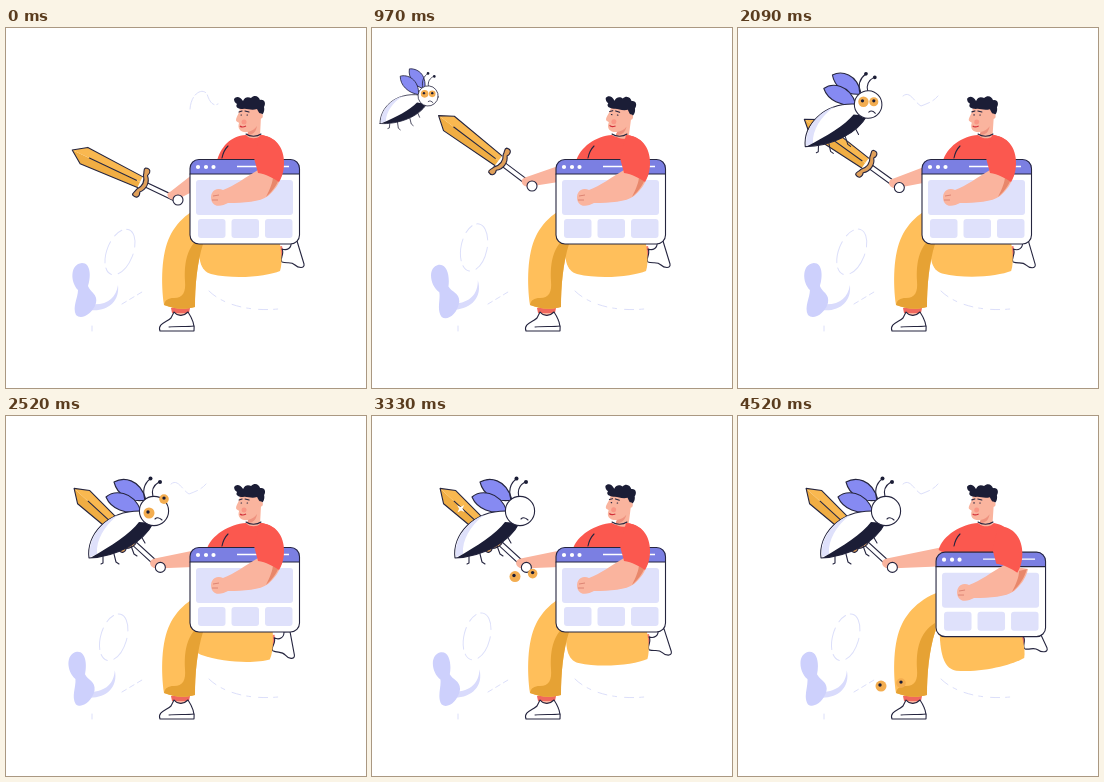
Animation, 360 px wide and 360 px high, one loop 4550 ms. Source, as an HTML page:

```html
<!DOCTYPE html>
<html lang="en">
<head>
<meta charset="utf-8">
<title>Bug hunt</title>
<style>
  html, body { margin: 0; width: 100%; height: 100%; overflow: hidden; background: #fff; }
  svg { display: block; width: 100vw; height: 100vh; }
  .ink { stroke: #25253f; stroke-width: 1.1; stroke-linecap: round; stroke-linejoin: round; }
  .line { fill: none; }
  .white { fill: #fff; }
  .dark { fill: #1b1d36; }
  .skin { fill: #fab49e; }
  .red { fill: #fb584f; }
  .gold { fill: #ffbf5b; }
  .shade { fill: #e6a234; }
  .violet { fill: #7b7fe2; }
  .pale { fill: #dfe1fb; }
  .faint { fill: none; stroke: #dcdffa; stroke-width: 1; stroke-linecap: round; }
</style>
</head>
<body>
<svg viewBox="0 0 360 360">
  <rect width="360" height="360" fill="#fff"/>

  <g id="plant">
    <ellipse class="faint" cx="114" cy="224" rx="13" ry="24" transform="rotate(22 114 224)" stroke-dasharray="22 7 9 5"/>
    <path d="M84 282C101 284 114 274 112 257C110 270 101 278 84 276Z" fill="#d9dbfc"/>
    <path d="M76 235C85 235 85 249 82 258C84 264 92 266 90 275C86 287 75 292 70 287C66 279 72 270 72 262C64 254 64 236 76 235Z" fill="#cdd0fc"/>
  </g>
  <path class="faint" d="M86 298V303M116 276L136 264" stroke-dasharray="5 4"/>
  <path class="faint" d="M203 263C215 275 240 284 272 281" stroke-dasharray="9 6 4 8"/>
  <path id="curl" class="faint" d="M184 81C185 66 196 59 201 66C203 72 206 79 212 76" stroke-dasharray="12 3"/>
  <path id="bird" class="faint" d="M165 68C172 62 176 74 183 78C188 76 195 74 200 68" stroke-dasharray="14 4"/>

  <g id="backLeg">
    <path d="M270 219L276 218L279 231L272 234Z" fill="#f2776b"/>
    <path class="ink white" d="M276 221C279 226 273 231 276 234C281 236 285 233 289 237C292 240 299 241 298 236L291 213L285 214C286 220 281 223 276 221Z"/>
    <path class="gold" d="M194 205C191 230 194 243 205 246C230 252 262 248 274 243C277 234 275 220 272 205Z"/>
  </g>

  <path class="skin" d="M166 277H183L182 289H167Z"/>
  <path d="M165 280H184L183 285H166Z" fill="#f0685e"/>
  <path class="ink white" d="M154 303C151 296 161 294 165 290L168 284C172 289 178 288 182 284C186 290 189 296 188 303Z"/>
  <path class="ink line" d="M163 299C172 298 180 299 188 298" stroke-width=".8"/>
  <path class="gold" d="M216 172C188 177 172 192 164 208C155 226 155 256 158 277C168 281 178 282 189 279C189 258 191 235 197 216L216 200Z"/>
  <path class="shade" d="M197 207C181 217 178 234 179 253C180 264 177 270 168 270C162 270 159 272 158 277C168 281 178 282 189 279C189 258 191 235 197 216Z"/>

  <g id="sword">
    <path d="M-42 6L-104 9L-117 0L-42 0Z" fill="#f0ad43"/>
    <path d="M-42 -6L-104 -9L-117 0L-42 0Z" fill="#f9b850"/>
    <path class="ink line" d="M-42 -6L-104 -9L-117 0L-104 9L-42 6M-98 0H-46" stroke-width=".9"/>
    <path id="glint" d="M0 -5L1.2 -1.2L5 0L1.2 1.2L0 5L-1.2 1.2L-5 0L-1.2 -1.2Z" fill="#fff" transform="translate(-88 1)"/>
    <rect class="ink white" x="-37" y="-2.400" width="33" height="4.800"/>
    <path class="ink" d="M-43 -15C-38 -17 -36 -13 -38 -9C-33 -4 -33 4 -38 9C-36 13 -38 17 -43 15C-45 13 -42 11 -42 8C-38 3 -38 -3 -42 -8C-42 -11 -45 -13 -43 -15Z" fill="#e0a05a"/>
  </g>
  <path id="arm" class="skin"/>
  <circle id="pommel" class="ink white" r="5"/>

  <path id="torso" class="red"/>
  <path class="ink line" d="M216 130C217 125 219 121 222 118"/>

  <g id="head">
    <path class="skin" d="M234 78C234 85 230 89 230 92C230 94 233 94 233 95C231 101 235 105 242 104L241 108C244 111 251 111 254 108L255 88L252 78Z"/>
    <path d="M242 104C246 103 249 101 251 98C250 104 247 107 241 107Z" fill="#ee927f"/>
    <circle cx="238" cy="94" r="2.500" fill="#f99685"/>
    <path class="dark" d="M228 71C230 68 234 68 237 73C239 68 243 69 245 70C249 66 253 69 254 72C259 71 260 76 258 79C259 83 257 87 255 87C253 85 252 83 251 81C245 83 241 80 237 81C232 81 229 79 231 76C229 75 228 73 228 71Z"/>
    <circle class="skin" cx="254" cy="88" r="2.800"/>
    <path class="ink line" d="M235 87H235.500M241 87H241.500M233 84L236 83M239 83L243 84" stroke-width="1"/>
    <path d="M234 98C236 100 238 99 240 98" fill="none" stroke="#d3303a" stroke-width="1.200"/>
  </g>
  <path class="ink line" d="M240 106C244 109 251 109 255 106"/>

  <g id="panel">
    <rect class="white" x="184" y="131.500" width="109.500" height="84.500" rx="9"/>
    <path class="violet" d="M184 146V140.500Q184 131.500 193 131.500H284.500Q293.500 131.500 293.500 140.500V146Z"/>
    <path class="ink line" d="M184 146H293.500" stroke-width="1"/>
    <path d="M192 139h0M200 139h0M207.500 139h0" stroke="#fff" stroke-width="4.200" stroke-linecap="round"/>
    <path d="M231 138.500H283" stroke="#fff" stroke-width="1.300"/>
    <g class="pale">
      <rect x="190" y="152" width="97" height="35" rx="3"/>
      <rect x="192" y="191" width="27.500" height="19" rx="3"/>
      <rect x="225.500" y="191" width="27.500" height="19" rx="3"/>
      <rect x="259" y="191" width="27.500" height="19" rx="3"/>
    </g>
    <rect class="ink line" x="184" y="131.500" width="109.500" height="84.500" rx="9" stroke-width="1.500"/>
  </g>

  <g id="forearm">
    <path class="skin" d="M252 142C240 149 228 158 217 162C213 160 208 161 206 165C204 169 205 175 209 177C213 179 218 177 222 175C238 175 254 174 262 168C269 162 274 155 276 146Z"/>
    <path d="M207 168L213 167M206 172L212 172" fill="none" stroke="#dd8574"/>
    <path d="M275 146C272 155 268 162 260 169C264 161 267 154 267 148Z" fill="#e8876b"/>
  </g>
  <path id="sleeve" class="red" d="M254 107C270 108 278 120 278 135C278 143 276 149 273 154C267 150 260 146 252 145L248 130Z"/>

  <g id="bug">
    <path class="ink line" d="M97 136V147L95 148M107 134L110 146L113 148M124 127L128 138L131 140M135 120L139 127"/>
    <g id="wings" class="ink" fill="#868af2">
      <path d="M140 84C134 62 117 61 108 66C111 78 123 87 140 84Z"/>
      <path d="M135 95C127 74 108 74 100 81C105 93 120 99 135 95Z"/>
    </g>
    <path class="ink white" d="M83 142C80 120 100 94 136 95L147 107C138 126 110 141 83 142Z"/>
    <path class="pale" d="M84 141C82 122 96 105 112 99C98 110 90 124 91 138Z"/>
    <path class="dark" d="M85 141.500C105 130 124 118 133 106L147 107C138 126 110 141 85 141.500Z"/>
    <path class="ink line" d="M139 84C136 74 139 67 144 63M147 81C145 74 148 69 153 66"/>
    <circle class="dark" cx="144.500" cy="62.500" r="2"/><circle class="dark" cx="154" cy="66" r="2"/>
    <circle class="ink white" cx="148" cy="95" r="14.600"/>
    <path class="ink line" d="M149 103C151 101 154 102 156 104"/>
  </g>
  <g id="eyeL"><circle r="5.500" fill="#f3ad50"/><circle class="dark" cx="-1" cy="-1" r="1.700"/></g>
  <g id="eyeR"><circle r="4.800" fill="#f3ad50"/><circle class="dark" cy="-1" r="1.700"/></g>
</svg>
<script>
const LOOP = 4550;
const el = Object.fromEntries([...document.querySelectorAll("[id]")].map(n => [n.id, n]));
const set = (id, name, value) => el[id].setAttribute(name, value);
const place = (id, value) => set(id, "transform", value);
const move = (id, x, y) => place(id, `translate(${x} ${y})`);
const mix = (a, b, u) => a + (b - a) * u;
const wave = (t, period) => (1 - Math.cos(2 * Math.PI * t / period)) / 2;

// Smooth step from 0 to 1 between two times.
function ramp(t, from, to) {
  const u = Math.min(1, Math.max(0, (t - from) / (to - from)));
  return u * u * (3 - 2 * u);
}

const strike = t => ramp(t, 1850, 2250);

function drawSword(t) {
  // Raise, draw back, then strike.
  const lift = ramp(t, 0, 970) - 1.2 * ramp(t, 970, 1610) + 1.67 * strike(t);
  const x = 172 - 12 * lift, y = 172 - 14 * lift;
  place("sword", `translate(${x} ${y}) rotate(${25.3 + 11.7 * lift})`);
  move("pommel", x, y);
  set("glint", "opacity", Math.max(0, 1 - Math.abs(t - 3330) / 130));

  const hx = x - 5, hy = y - 4, sx = 211, sy = 140;
  const len = Math.hypot(sx - hx, sy - hy);
  const nx = (hy - sy) / len, ny = (sx - hx) / len;
  set("arm", "d", `M${hx - nx * 5} ${hy - ny * 5}L${sx - nx * 10} ${sy - ny * 10}` +
    `L${sx + nx * 10} ${sy + ny * 10}L${hx + nx * 5} ${hy + ny * 5}` +
    `C${hx - 7} ${hy + 4} ${hx - 7} ${hy - 4} ${hx - nx * 5} ${hy - ny * 5}Z`);

  const left = 201 + (x - 155) * .57;
  set("torso", "d", `M${left} 134C${left + 4} 119 224 108 240 107C245 110 251 110 256 107` +
    `C272 110 278 122 276 140L268 180H214L212 140Z`);
}

function drawBug(t) {
  const shown = t > 560 ? "visible" : "hidden";
  for (const id of ["bug", "eyeL", "eyeR"]) set(id, "visibility", shown);

  // Slows down on the way in, then drops onto the blade.
  const away = Math.exp((970 - t) / 430), hit = strike(t);
  const x = mix(100 - 44 * away, 148, hit);
  const y = mix(40 + 28 * away, 95, hit);
  const scale = mix(.85 - .16 * away, 1, hit);
  place("bug", `translate(${x} ${y}) rotate(${6 * (1 - hit)}) scale(${scale}) translate(-148 -95)`);
  place("wings", `rotate(${(1 - hit) * (14 + 8 * Math.sin(t / 38))} 136 92)`);

  const pop = ramp(t, 2250, 2520);
  const fall = from => .092 * Math.max(0, t - from);
  const eye = (id, dx, dy, drop) =>
    place(id, `translate(${x + scale * dx} ${y + scale * dy + drop}) scale(${scale})`);
  eye("eyeL", -5, -3 + 5 * pop, fall(2640));
  eye("eyeR", 6 + 4 * pop + 5 * ramp(t, 2520, 4090), -3 - 9 * pop, fall(2520));
}

function drawHero(t) {
  const nod = wave(t, 2420);
  place("head", `translate(${3 * nod} ${.5 * nod}) rotate(${5 * nod} 247 108)`);

  const kick = 1.8 * ramp(t, 2700, 3950) - .8 * ramp(t, 2000, 2500);
  place("backLeg", `translate(${10 * kick} ${4 * kick}) rotate(${-8 * kick} 240 225)`);

  const slip = 14 * (Math.max(0, t - 3900) / 620) ** 2;
  move("panel", slip, slip * .33);
  move("forearm", slip, slip * .5);
  move("sleeve", slip * .45, slip * .2);
}

function draw(t) {
  place("plant", `rotate(${-10 * wave(t, 2000)} 82 290)`);
  set("curl", "opacity", 1 - ramp(t, 300, 800));
  set("bird", "opacity", ramp(t, 1150, 1500) - ramp(t, 2450, 2900) + ramp(t, 3600, 4000));
  drawHero(t);
  drawSword(t);
  drawBug(t);
}

const start = performance.now();
function tick() {
  draw(Math.max(0, performance.now() - start) % LOOP);
  requestAnimationFrame(tick);
}
draw(0);
requestAnimationFrame(tick);
</script>
</body>
</html>
```
